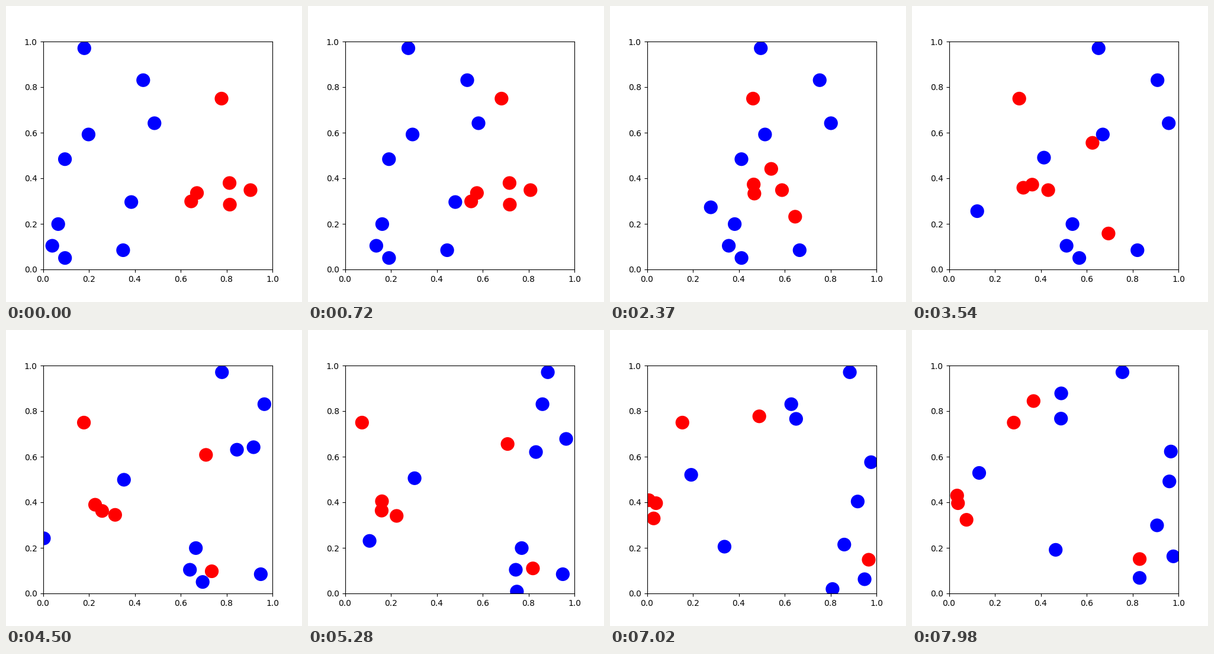
Animation of 500x500 px, one loop 8 s. Source, as a matplotlib script:

```python
from itertools import combinations

import numpy as np
import matplotlib.pyplot as plt
from matplotlib.animation import FuncAnimation
from matplotlib.collections import EllipseCollection

SIZE, DPI = 500, 100
LOOP, TICK, STEP = 8000, 20, 30   # ms
RADIUS, SPEED = 0.03, 0.004       # box widths, box widths per step

# Starting places in the unit box; the right half is red and flies left,
# the left half is blue and flies right.
START = np.array([
    (0.7783, 0.7496), (0.8145, 0.2844), (0.8132, 0.3792), (0.6711, 0.3354),
    (0.3849, 0.2957), (0.6461, 0.2986), (0.9045, 0.3481), (0.1801, 0.9706),
    (0.4369, 0.8304), (0.4859, 0.6416), (0.1985, 0.5922), (0.0957, 0.4839),
    (0.0663, 0.1990), (0.0405, 0.1039), (0.0960, 0.0503), (0.3494, 0.0844),
])
IS_RED = START[:, 0] > 0.5
PAIRS = np.array(list(combinations(range(len(START)), 2)))


def collide(pos, vel):
    """Swap the speeds of touching balls along their line of centres."""
    gap = pos[PAIRS[:, 0]] - pos[PAIRS[:, 1]]
    hit = np.hypot(gap[:, 0], gap[:, 1]) < 2 * RADIUS
    a, b = PAIRS[hit].T
    gap = gap[hit]
    share = np.sum((vel[a] - vel[b]) * gap, axis=1) / np.sum(gap ** 2, axis=1)
    push = share[:, None] * gap
    vel[a], vel[b] = vel[a] - push, vel[b] + push


def bounce(pos, vel):
    speed = np.abs(vel)
    vel[pos > 1] = -speed[pos > 1]
    vel[pos < 0] = speed[pos < 0]


def simulate(steps):
    pos = START.copy()
    vel = np.zeros_like(pos)
    vel[:, 0] = np.where(IS_RED, -SPEED, SPEED)
    states = [pos.copy()]
    for _ in range(steps):
        collide(pos, vel)
        bounce(pos, vel)
        pos += vel
        states.append(pos.copy())
    return states


STATES = simulate(LOOP // STEP)

fig, ax = plt.subplots(figsize=(SIZE / DPI, SIZE / DPI), dpi=DPI)
fig.subplots_adjust(left=0.125, right=0.9, bottom=0.11, top=0.88)
ax.set_xlim(0, 1)
ax.set_ylim(0, 1)


def balls(color, chosen):
    d = np.full(chosen.sum(), 2 * RADIUS)
    dots = EllipseCollection(d, d, np.zeros_like(d), units="xy",
                             facecolors=color, edgecolors="none",
                             offsets=START[chosen],
                             offset_transform=ax.transData)
    ax.add_collection(dots, autolim=False)
    return dots


red = balls("red", IS_RED)
blue = balls("blue", ~IS_RED)


def draw(frame):
    pos = STATES[(frame * TICK + TICK // 2) // STEP]
    red.set_offsets(pos[IS_RED])
    blue.set_offsets(pos[~IS_RED])
    return red, blue


anim = FuncAnimation(fig, draw, frames=LOOP // TICK, interval=TICK,
                     init_func=lambda: draw(0), repeat=True, repeat_delay=0)
plt.show()
```
